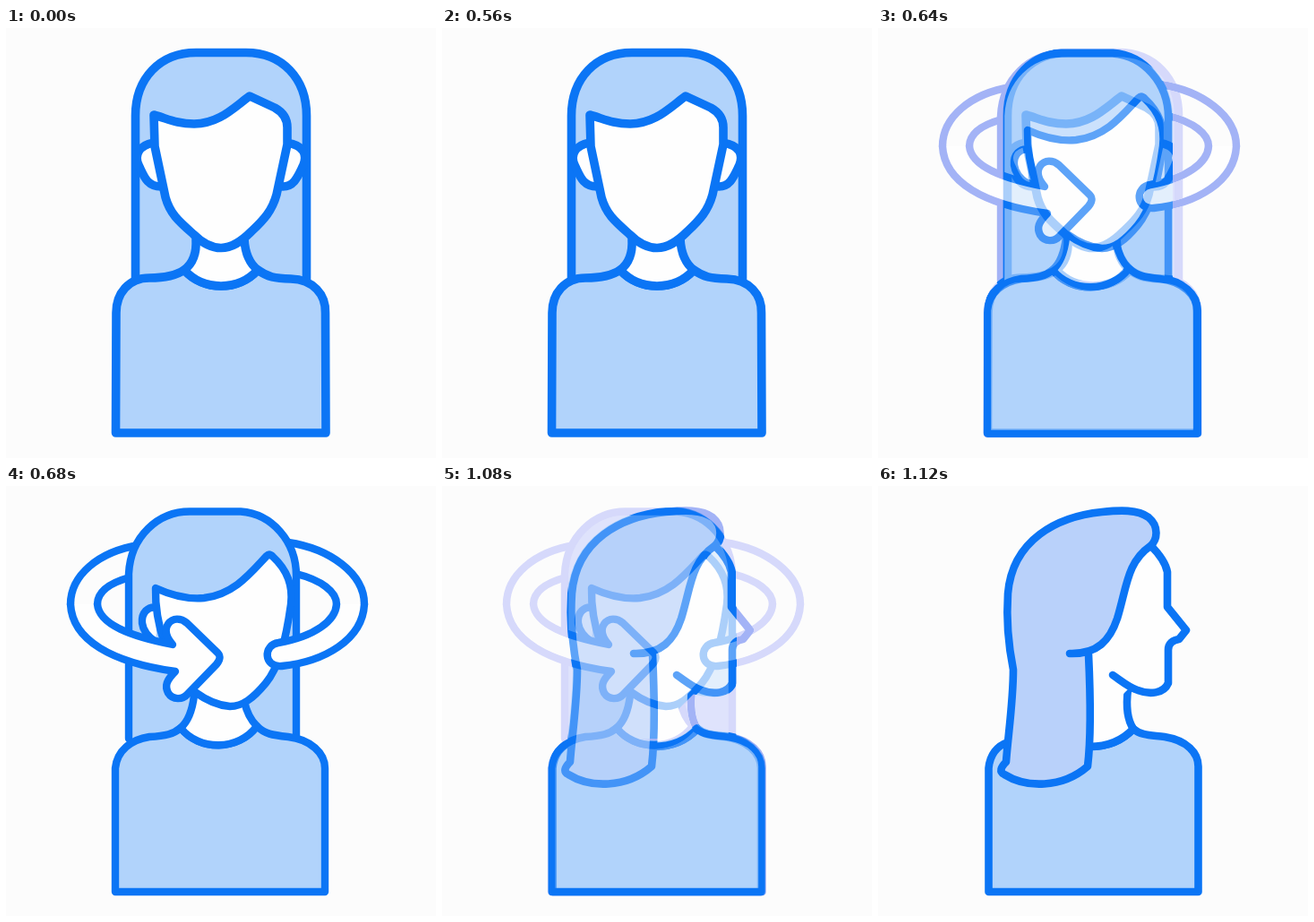
Write an HTML page that moves like this. It is 480 by 480 pixels and loops after 2 s.

```html
<!DOCTYPE html>
<html lang="en">
<head>
<meta charset="utf-8">
<title>Turning head</title>
<style>
html, body { margin: 0; width: 100%; height: 100%; overflow: hidden; background: #fcfcfc; }
svg { display: block; width: 100%; height: 100%; }
path { fill: none; stroke: var(--line); stroke-linecap: round; stroke-linejoin: round; }
.tone { fill: var(--tone); }
.back { fill: var(--back, var(--tone)); }
.skin { fill: #fefefe; }
.sil path { fill: #fff; stroke: #fff; stroke-width: 10; }
.solid { --line: #0b75f5; --tone: #b1d3fb; --back: #b9d1fa; }
.soft { --line: #a3b3f6; --tone: #c8d6fb; }
.pale { --line: #d6d9fb; --tone: #dfe3fc; mix-blend-mode: darken; }
.view { visibility: hidden; }
#front { stroke-width: 9.6; }
#turn { stroke-width: 8.4; }
#side { stroke-width: 8.6; }
</style>
</head>
<body>
<svg id="stage" viewBox="0 0 480 480" xmlns="http://www.w3.org/2000/svg"></svg>
<script>
const path = (kind, d) => `<path class="${kind}" d="${d}"/>`;

const front = {
  hair: 'M144.5 282V98C144.5 56 172 27.5 212 27.5H268C308 27.5 335.5 56 335.5 98V282',
  body: 'M122.5 452L123 318C123 296 137 279 160 279C176 279 189 277 199 270C220 294 260 294 281 270C292 278 300 279.5 318 280C343 281 357 297 356.5 318L357 452Z',
  neck: 'M212 236C213 253 207 264 199 270C220 294 260 294 281 270C272 263 267 252 266 236',
  ears: 'M165 128C148 131 143 142 148 153C154 165 157 177 173 177M313 128C334 131 336 142 332 153C326 165 322 177 309 177',
  face: 'M165 97C180 101 190 107 210 107C238 107 255 88 272 76L300 89C309 94 314 101 314 111V130L302 186C297 204 288 214 274 227C262 239 252 245.5 240 245.5C228 245.5 218 239 209 230C192 215 183 207 178 189L166 132Z'
};

const turn = {
  ring: 'M149 66C103 73 72 100 72 132M138 102C113 109 102 120 102 132M315 63C362 70 400 98 400 132M324 98C352 105 369 118 369 132',
  hair: 'M137 282V98C139 56 170 28.5 205 28.5H262C297 31 324 62 324 100V282',
  body: 'M122 453V315C124 295 140 283 160 280C178 279 187 277 195 270C215 296 260 296 280 268C289 277 297 278 315 280C340 283 356 298 356 315V453Z',
  neck: 'M210 234C208 250 203 263 195 270C215 296 260 296 280 268C272 260 268 250 266 240',
  ear: 'M170 136C158 133 151 142 152 153C153 162 158 168 167 174',
  face: 'M167 114C178 119 200 127 221 125C255 121 274 96 291 78Q294 75 298 79C311 91 321 108 318 132C312 175 304 203 290 220C276 237 264 246 250 246C235 245 222 238 211 230C180 205 166 150 167 114Z',
  arrow: 'M72 132C74 172 118 197 189 207C179 217 177 223 181 231C186 239 197 239 203 232L235 199C240 193 240 189 234 184L202 153C195 147 186 147 181 154C177 160 178 168 186 177C140 168 104 155 102 132',
  tail: 'M400 132C398 172 355 196 308 201C287 203 287 177 304 175C345 168 368 150 369 132'
};

const side = {
  body: 'M123.5 453V315C125 300 133 290 145 286L236 291C258 291 274 283 285 271C294 279 305 278 320 280C345 284 357.5 298 357.5 313V453Z',
  neck: 'M228 190L228 290L236 291C258 291 274 283 285 271C277 259 277 243 279 227',
  face: 'M304 66C313 75 321 85 323 96V135L344 161L336 171C329 172 324 176 324 183V220C319 232 303 233 290 228C280 225 271 217 262 211',
  skin: 'M304 66C313 75 321 85 323 96V135L344 161L336 171C329 172 324 176 324 183V220C319 232 303 233 279 227L236 270V187Z',
  hair: 'M214 187C245 188 259 172 267 148C278 112 278 85 304 67C312 60 314 45 302 35C290 26 270 27 250 29C200 34 150 60 145 120C143 150 146 180 151 205C151 240 145 280 143 308C137 314 135 319 141 322C165 337 205 338 234 313C238 280 237 230 235 188'
};

const scenes = {
  front: path('tone', front.hair) + path('tone', front.body) + path('skin', front.neck) +
    path('skin', front.ears) + path('skin', front.face),
  turn: path('', turn.ring) + path('tone', turn.hair) + path('tone', turn.body) +
    path('skin', turn.neck) + path('skin', turn.ear) + path('skin', turn.face) +
    path('skin', turn.arrow) + path('skin', turn.tail),
  side: path('tone', side.body) + path('skin', side.neck) +
    `<path class="skin" style="stroke:none" d="${side.skin}"/>` +
    path('', side.face) + path('back', side.hair)
};

const outlines = {
  front: [front.hair, front.body],
  turn: [turn.hair, turn.body],
  side: [side.hair, side.body, side.skin]
};

const draw = (name, kind, opacity = 1) =>
  `<use href="#${name}" class="${kind}" opacity="${opacity}"/>`;

// Cross-fade where both figures overlap, lavender tints elsewhere.
function fade(from, to, mix) {
  const [main, rest] = mix > 0.5 ? [to, from] : [from, to];
  return draw(main, 'soft') + draw(rest, 'pale') +
    `<g mask="url(#in-${from})"><g mask="url(#in-${to})">` +
    draw(from, 'solid') + draw(to, 'solid', mix) + '</g></g>';
}

// Start time in ms and picture.
const steps = [
  [0, draw('front', 'solid')],
  [600, fade('front', 'turn', 0.34)],
  [640, fade('front', 'turn', 0.66)],
  [680, draw('turn', 'solid')],
  [1040, fade('turn', 'side', 0.34)],
  [1080, fade('turn', 'side', 0.66)],
  [1120, draw('side', 'solid')]
];

const defs = Object.keys(scenes).map(name =>
  `<g id="${name}">${scenes[name]}</g>` +
  `<mask id="in-${name}" class="sil" maskUnits="userSpaceOnUse" x="0" y="0" width="480" height="480">` +
  outlines[name].map(d => path('', d)).join('') + '</mask>').join('');

const stage = document.getElementById('stage');
stage.innerHTML = `<defs>${defs}</defs>` +
  steps.map(([, art]) => `<g class="view">${art}</g>`).join('');
const views = [...stage.querySelectorAll('.view')];

const LOOP = 2000;
const start = performance.now();
function tick() {
  const t = (performance.now() - start) % LOOP;
  const now = steps.findLastIndex(([at]) => t >= at);
  views.forEach((view, i) => { view.style.visibility = i === now ? 'visible' : 'hidden'; });
  requestAnimationFrame(tick);
}
tick();
</script>
</body>
</html>
```
